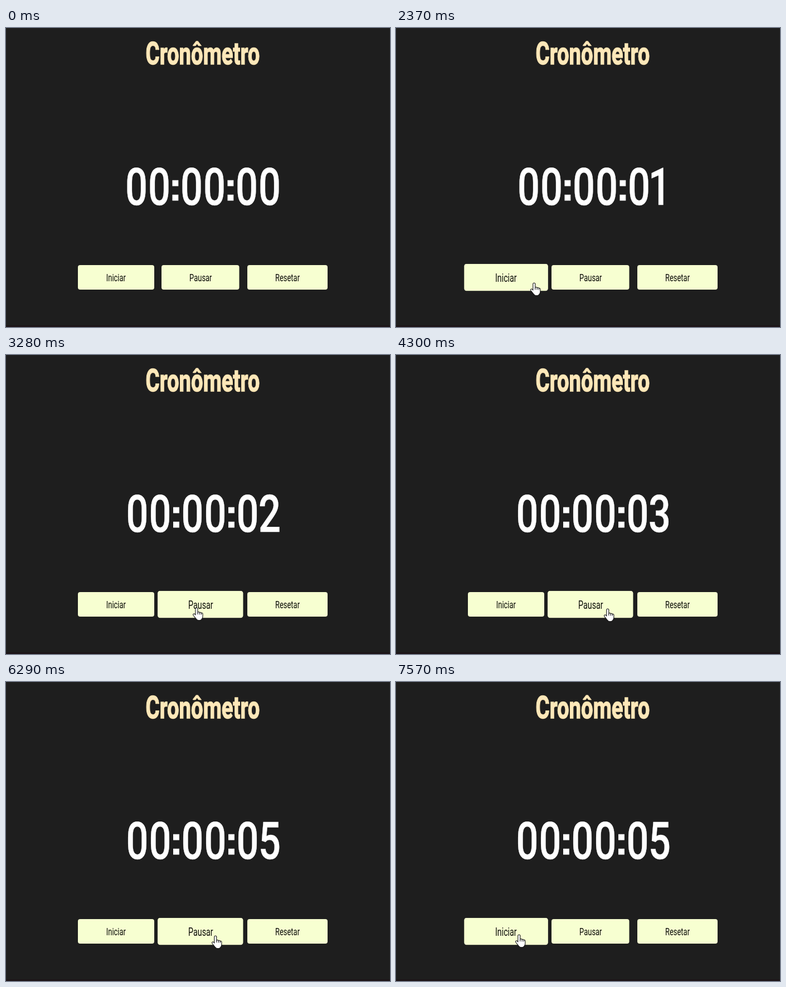
Recreate the animation shown at these times as an HTML page. Size 689 by 536 pixels, loop 8 s.

```html
<!DOCTYPE html>
<html lang="pt-BR">
<head>
<meta charset="utf-8">
<title>Cronômetro</title>
<style>
html, body { margin: 0; width: 100%; height: 100%; overflow: hidden; background: #1e1e1e; }
svg { display: block; width: 689px; height: 536px; overflow: hidden; }
text { font-family: Roboto, "Liberation Sans", sans-serif; text-anchor: middle; }

.title { font-size: 55.5px; font-weight: 700; fill: #fde8ba; stroke: #fae2b0; stroke-width: 1.5; transform: scaleX(.69); }
.label { font-size: 18px; font-weight: 400; fill: #0c0c08; transform: scaleX(.72); }
.digit { font-size: 92px; font-weight: 500; fill: #fff; stroke: #fff; stroke-width: .5; transform: scaleX(.765); }
.colon { font: 700 70px "Liberation Sans", Arial, sans-serif; fill: #fff; stroke: #fff; stroke-width: 1; }

.button { transform-box: fill-box; transform-origin: center; }
.button rect { fill: #f7ffd1; }
.start { animation: start 8s linear infinite; }
.pause { animation: pause 8s linear infinite; }
.reel { animation: tick 8s step-end infinite; }
.cursor { animation: move 8s linear infinite; }
.halo { fill: #ff0; opacity: 0; animation: press 8s step-end infinite; }
.hand { fill: #fff; stroke: #111; stroke-width: 1.1; stroke-linejoin: round; }

@keyframes start {
  0%, 5% { transform: scale(1); }
  6.875%, 34.6% { transform: scale(1.1); }
  36.4%, 91.4% { transform: scale(1); }
  93.2%, 100% { transform: scale(1.1); }
}
@keyframes pause {
  0%, 35.1% { transform: scale(1); }
  36.9%, 91% { transform: scale(1.1); }
  92.8%, 100% { transform: scale(1); }
}
@keyframes tick {
  0% { transform: translateY(0); }
  29.625% { transform: translateY(-600px); }
  41% { transform: translateY(-1200px); }
  53.75% { transform: translateY(-1800px); }
  66.25% { transform: translateY(-2400px); }
  78.625%, 100% { transform: translateY(-3000px); }
}
@keyframes press {
  0% { opacity: 0; }
  16.25% { opacity: .62; }
  17% { opacity: 0; }
  82% { opacity: .62; }
  82.875%, 100% { opacity: 0; }
}
@keyframes move {
  0%, 1.62% { transform: translate(485px, 600px); }
  1.625% { transform: translate(485px, 526px); }
  4.8% { transform: translate(296px, 479px); }
  6.875%, 19.6% { transform: translate(223px, 458px); }
  21.25%, 32% { transform: translate(247px, 457px); }
  41% { transform: translate(341px, 453px); }
  42.75% { transform: translate(359px, 453px); }
  45.25%, 62.9% { transform: translate(379px, 455px); }
  66.25%, 84.5% { transform: translate(375px, 455px); animation-timing-function: ease-in; }
  89.55% { transform: translate(298px, 457px); animation-timing-function: ease-out; }
  94.625%, 100% { transform: translate(220px, 453px); }
}
</style>
</head>
<body>
<svg viewBox="0 0 689 536">
  <rect width="689" height="536" fill="#1e1e1e"/>
  <rect y="533" width="689" height="3" fill="#1d1518"/>

  <g transform="translate(353 65)"><text class="title">Cronômetro</text></g>

  <g class="reel" id="reel"></g>

  <g class="button start">
    <rect x="129" y="425" width="137" height="44" rx="4"/>
    <g transform="translate(197.3 454)"><text class="label">Iniciar</text></g>
  </g>
  <g class="button pause">
    <rect x="279" y="425" width="139.5" height="44" rx="4"/>
    <g transform="translate(349.3 454)"><text class="label">Pausar</text></g>
  </g>
  <g class="button">
    <rect x="433" y="425" width="144" height="44" rx="4"/>
    <g transform="translate(505 454)"><text class="label">Resetar</text></g>
  </g>

  <g class="cursor">
    <circle class="halo" r="12"/>
    <g class="hand" transform="translate(1 0)">
      <path d="M-2.2 13V2a2 2 0 0 1 4 0V8q2-1.2 3.4.6q2-.9 3.1.9q2.4-.6 2.6 1.8V15.5q0 2.6-1.7 4.7q-1.5 2.6-4.7 2.6q-3.6 0-5.2-2.5L-5.8 14q-1.4-2.3.3-3.1q1.7-.6 3.3 2.1z"/>
      <path fill="none" d="M1.8 8v4M5.2 8.8v3.4M8.3 9.7v2.8"/>
    </g>
  </g>
</svg>
<script>
const NS = "http://www.w3.org/2000/svg";
const reel = document.getElementById("reel");

// Advance of each glyph in px
const advance = { ":": 17, 0: 41, 1: 33, 4: 40 };
const widthOf = c => advance[c] || 38;

function glyph(c, x, y) {
  const g = document.createElementNS(NS, "g");
  const t = document.createElementNS(NS, "text");
  g.setAttribute("transform", `translate(${x} ${y})`);
  t.setAttribute("class", c === ":" ? "colon" : "digit");
  t.textContent = c;
  g.append(t);
  reel.append(g);
}

function clock(sec) {
  const chars = [..."00:00:0" + sec];
  const total = chars.reduce((sum, c) => sum + widthOf(c), 0);
  let x = 353.5 - total / 2;
  for (const c of chars) {
    const w = widthOf(c);
    glyph(c, x + w / 2, sec * 600 + (c === ":" ? 308.5 : 317));
    x += w;
  }
}

for (let sec = 0; sec < 6; sec++) clock(sec);
</script>
</body>
</html>
```
